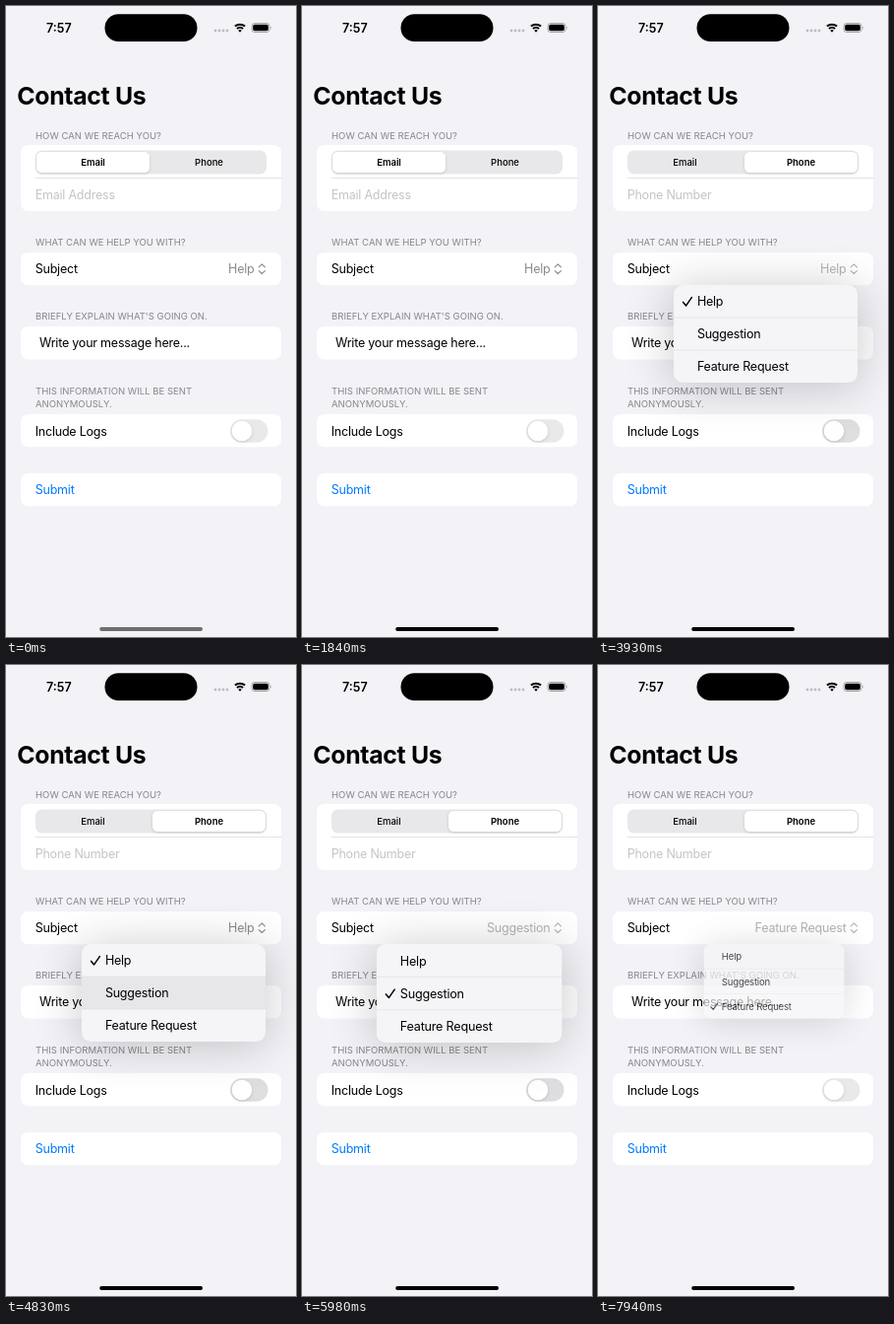
An HTML page that plays this animation: 295x640 px, repeating every 8 s.

```html
<!DOCTYPE html>
<html lang="en">
<head>
<meta charset="utf-8">
<title>Contact form</title>
<style>
  html, body { margin: 0; width: 100%; height: 100%; overflow: hidden; background: #f2f2f7; }
  svg { display: block; width: 100vw; height: 100vh; }
  text { font: 12.5px Inter, "Liberation Sans", sans-serif; letter-spacing: -.22px; font-optical-sizing: none; }
  .title { font-size: 24.8px; font-weight: 700; letter-spacing: -.3px; }
  .clock { font-weight: 600; letter-spacing: 0; }
  .head { font-size: 9.5px; letter-spacing: .03px; fill: #86868b; }
  .seg { font-size: 9.5px; font-weight: 500; letter-spacing: 0; text-anchor: middle; }
  .hint { fill: #c5c5c7; }
  .card { fill: #fff; }
  .line { fill: none; stroke-linecap: round; stroke-linejoin: round; }
  .soft { filter: drop-shadow(0 1px 1.5px rgba(0,0,0,.15)); }
</style>
</head>
<body>
<svg viewBox="0 0 295 640">
  <rect width="295" height="640" fill="#f2f2f7"/>

  <text class="clock" x="41" y="26.5">7:57</text>
  <rect x="100.5" y="8.3" width="94" height="27.8" rx="13.9"/>
  <g fill="#bdbdc1">
    <circle cx="213" cy="25" r="1.4"/><circle cx="217" cy="25" r="1.4"/>
    <circle cx="221" cy="25" r="1.4"/><circle cx="225" cy="25" r="1.4"/>
  </g>
  <path d="M232.9 20.6a7.6 7.6 0 0 1 10.2 0M234.9 23a4.8 4.8 0 0 1 6.2 0" fill="none" stroke="#000" stroke-width="2"/>
  <path d="M236.2 24.8a2.8 2.8 0 0 1 3.6 0L238 26.8z"/>
  <rect x="250" y="17.5" width="18" height="9" rx="2.8" fill="none" stroke="#000" stroke-opacity=".4" stroke-width=".8"/>
  <rect x="251.2" y="18.7" width="15.6" height="6.6" rx="1.7"/>
  <path d="M269.2 20.6q1.3 1.4 0 2.8z" opacity=".45"/>

  <text class="title" x="11.2" y="100.4">Contact Us</text>

  <text class="head" x="30" y="134.5">HOW CAN WE REACH YOU?</text>
  <rect class="card" x="15" y="141" width="265" height="67" rx="7.5"/>
  <rect x="30" y="146.5" width="235" height="24" rx="6.7" fill="#e8e8ea"/>
  <rect id="pill" class="soft" x="31" y="148" width="115" height="21" rx="5.2" fill="#fff"/>
  <text id="email" class="seg" x="88.5" y="162">Email</text>
  <text id="phone" class="seg" x="206.5" y="162">Phone</text>
  <path d="M30 174.5H280" stroke="#d9d9dc" stroke-width=".7"/>
  <text id="hint" class="hint" x="29.7" y="195.9"></text>

  <text class="head" x="30" y="243">WHAT CAN WE HELP YOU WITH?</text>
  <rect class="card" x="15" y="250" width="265" height="33.3" rx="7.5"/>
  <text x="29.7" y="271.1">Subject</text>
  <g id="subject">
    <text id="value" x="252.5" y="271.1" text-anchor="end" fill="#8a8a8e"></text>
    <path class="line" d="M257.2 264.8l3.1-2.9 3.1 2.9M257.2 268.6l3.1 2.9 3.1-2.9" stroke="#8a8a8e" stroke-width="1.15"/>
  </g>

  <text class="head" x="30" y="318.4">BRIEFLY EXPLAIN WHAT'S GOING ON.</text>
  <rect class="card" x="15" y="325" width="265" height="33.5" rx="7.5"/>
  <text x="34.1" y="346.4">Write your message here...</text>

  <text class="head" x="30" y="393.9">THIS INFORMATION WILL BE SENT</text>
  <text class="head" x="30" y="407.4">ANONYMOUSLY.</text>
  <rect class="card" x="15" y="414" width="265" height="33.3" rx="7.5"/>
  <text x="29.7" y="435.5">Include Logs</text>
  <rect id="track" x="228" y="419.3" width="38.5" height="23.4" rx="11.7"/>
  <circle class="soft" cx="240" cy="431" r="10.3" fill="#fff"/>

  <rect class="card" x="15" y="474" width="265" height="33.3" rx="7.5"/>
  <text x="29.7" y="495.1" fill="#007aff">Submit</text>

  <g id="menu">
    <rect x="75" y="285" width="191" height="101" rx="12" opacity=".2" style="filter:blur(24px)"/>
    <clipPath id="round"><rect x="77" y="283" width="187" height="99" rx="9.5"/></clipPath>
    <g clip-path="url(#round)">
      <rect x="77" y="283" width="187" height="99" fill="#f5f5f7"/>
      <rect id="highlight" x="77" width="187" height="33" fill="#e7e7ea"/>
      <path d="M77 316H264M77 349H264" stroke="#dcdce0" stroke-width=".6"/>
    </g>
    <text x="100.9" y="304.4">Help</text>
    <text x="100.9" y="337.4">Suggestion</text>
    <text x="100.9" y="370.4">Feature Request</text>
    <path id="check" class="line" d="M86.6 300.4l3 3.5 5.7-8.3" stroke="#000" stroke-width="1.5"/>
  </g>

  <rect id="home" x="95.2" y="630.1" width="104.8" height="3.8" rx="1.9"/>
</svg>
<script>
const LOOP = 8000;
const OPTIONS = ["Help", "Suggestion", "Feature Request"];
const ROW = 33;
const el = id => document.getElementById(id);
const attr = (id, values) => {
  for (const name in values) el(id).setAttribute(name, values[name]);
};

// Slider moves: start, end, target side, share of the way at each step
const SLIDES = [
  [500, 840, 1, [0, .5, .93, 1]],
  [1410, 1840, 0, [0, .2, .7, .96, 1]],
  [2260, 2580, 1, [0, .5, .93, 1]],
];
// Menu visits: open start, open end, close start, close end, checked row, picked row
const VISITS = [
  [3370, 3930, 4830, 5070, 0, 1],
  [5630, 6200, 6730, 6950, 1, 2],
  [7830, 8380, 9000, 9220, 2, 2],
];
// [scale, opacity] at each step
const OPENING = [[.5, 0], [.765, .7], [.97, 1], [1.01, 1], [1, 1], [1, 1]];
const CLOSING = [[1, 1], [.72, .4], [.5, 0]];

// Index of the current step, -1 before the start
const stepAt = (t, start, end, count) => t < start ? -1 :
  Math.min(count - 1, Math.floor((t - start) / (end - start) * (count - 1) + .05));

function drawSlider(t) {
  let pos = 0, side = 0, pressed = -1;
  for (const [start, end, target, path] of SLIDES) {
    const k = stepAt(t, start, end, path.length);
    if (k < 0) break;
    pos = target ? path[k] : 1 - path[k];
    side = k ? target : 1 - target;
    pressed = k ? -1 : target;
  }
  attr("pill", { x: 31 + 118 * pos });
  ["email", "phone"].forEach((id, i) => {
    el(id).style.fontWeight = side === i ? 600 : 500;
    attr(id, { opacity: pressed === i ? .4 : 1 });
  });
  el("hint").textContent = side ? "Phone Number" : "Email Address";
  const grey = 110 * (1 - (stepAt(t, 500, 840, 4) + 1) / 4);
  attr("home", { fill: `rgb(${grey},${grey},${grey})` });
}

function drawMenu(t) {
  let chosen = 0, checked = 0, picked = -1, dim = 1, pose = OPENING[0];
  for (const [open, opened, close, closed, before, after] of VISITS) {
    const k = stepAt(t, open, opened, OPENING.length);
    if (k < 0) break;
    const c = stepAt(t, close, closed, CLOSING.length);
    checked = before;
    chosen = c > 0 ? after : before;
    picked = c < 0 ? -1 : after;
    pose = c < 0 ? OPENING[k] : CLOSING[c];
    dim = c >= 0 ? 1 : k ? .65 : .45;
  }
  const [scale, opacity] = pose;
  attr("menu", { opacity, transform: `translate(207 283) scale(${scale}) translate(-207 -283)` });
  attr("check", { transform: `translate(0 ${ROW * checked})` });
  attr("highlight", { y: 283 + ROW * picked, opacity: picked < 0 ? 0 : 1 });
  attr("subject", { opacity: dim });
  attr("track", { fill: opacity === 1 ? "#dedee1" : "#e9e9ea" });
  el("value").textContent = OPTIONS[chosen];
}

function frame() {
  const t = performance.now() % LOOP;
  drawSlider(t);
  drawMenu(t);
  requestAnimationFrame(frame);
}
frame();
</script>
</body>
</html>
```
